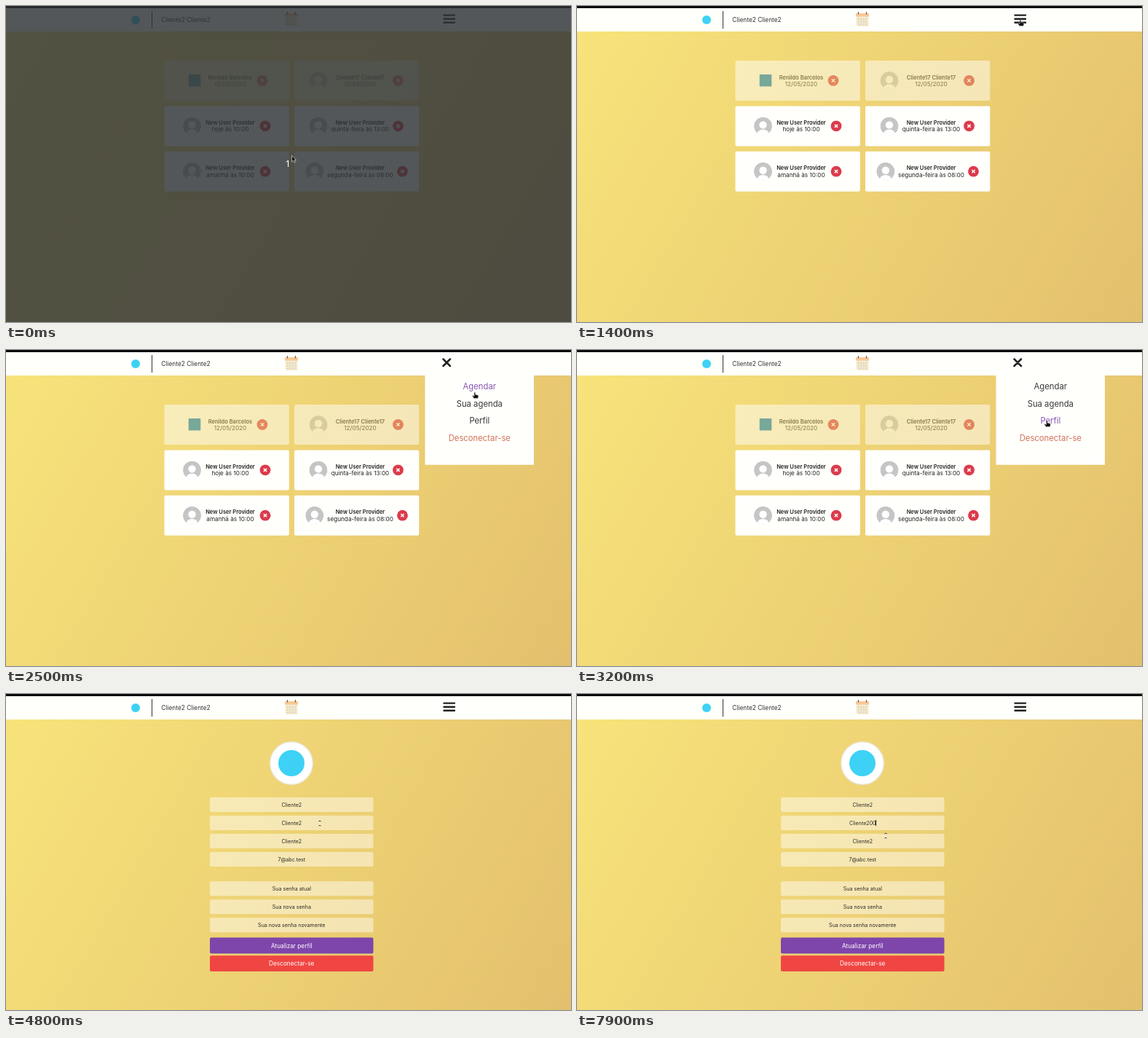
These frames come from a looping animation (776 px wide and 434 px high, 8 s). An HTML page:

```html
<!DOCTYPE html>
<html lang="pt">
<head>
<meta charset="utf-8">
<style>
  html, body { margin: 0; width: 100%; height: 100%; overflow: hidden; }
  svg { display: block; width: 100vw; height: 100vh; font-family: Inter, sans-serif; }
  .mid { text-anchor: middle; }
  .field { font-size: 7.1px; fill: #2b2822; }
  .menu { font-size: 11.3px; fill: #383838; }
</style>
</head>
<body>
<svg id="stage" viewBox="0 0 776 434">
  <defs>
    <linearGradient id="bg" gradientUnits="userSpaceOnUse" x1="5" y1="-6" x2="771" y2="440">
      <stop offset="0" stop-color="#f8e47b"/>
      <stop offset="1" stop-color="#e3c06d"/>
    </linearGradient>
    <clipPath id="round"><circle r="12.5"/></clipPath>
    <clipPath id="below"><rect y="35" width="776" height="399"/></clipPath>
    <g id="avatar" clip-path="url(#round)">
      <circle r="12.5" fill="#c5c5c5"/>
      <circle cy="-1.5" r="5.2" fill="#fff"/>
      <ellipse cy="10.5" rx="8" ry="5.8" fill="#fff"/>
    </g>
    <g id="cancel">
      <circle r="7.4" fill="#db3b4b"/>
      <path d="M-2.1-2.1 2.1 2.1M2.1-2.1-2.1 2.1" stroke="#fff" stroke-width="1.5"/>
    </g>
  </defs>

  <rect width="776" height="434" fill="url(#bg)"/>
  <g id="agenda"></g>
  <g id="profile">
    <circle cx="392" cy="95" r="29.3" fill="#fff" stroke="#ebe6d8" stroke-width="1.4"/>
    <circle cx="392" cy="95" r="18" fill="#3dd2f5"/>
  </g>

  <g clip-path="url(#below)">
    <g id="panel"><rect x="575.5" y="20" width="149.5" height="137.7" fill="#fffffc"/></g>
  </g>

  <rect width="776" height="35" fill="#fffffc"/>
  <rect width="776" height="3" fill="#0a0808"/>
  <circle cx="178" cy="19" r="6" fill="#3dd2f5"/>
  <path d="M200.5 7V31" stroke="#333"/>
  <text x="213.3" y="22" font-size="8.35" fill="#333">Cliente2 Cliente2</text>
  <g id="calendar">
    <path d="M383.5 11H400.5V28H385.5L383.5 26Z" fill="#f3ead2"/>
    <path d="M383 10H401V14.5H383Z" fill="#f9c993"/>
    <path d="M386.5 8V11.5M397.5 8V11.5" stroke="#655b50" stroke-width="1.2"/>
    <path d="M386 18H399M386 21.5H399M386 25H399" stroke="#d9cba8" stroke-width="1.4" stroke-dasharray="1.8 1.6"/>
  </g>
  <path id="burger" d="M601.5 12.6H616M601.5 17.7H616M601.5 22.8H616" stroke="#222" stroke-width="2.4" stroke-linecap="round"/>
  <path id="close" d="M600.5 12.5 610 22M610 12.5 600.5 22" stroke="#222" stroke-width="2.5" stroke-linecap="round"/>

  <g id="shade">
    <rect width="776" height="434" fill="#2e3236" opacity=".82"/>
    <text x="383.6" y="221" font-size="13" fill="#fff" font-family="Noto Sans, sans-serif">1</text>
  </g>

  <path id="caret" d="M0 173V181" stroke="#111"/>
  <path id="arrow" d="M0 0V8.4L2 6.7 3.4 9.6 5 8.9 3.6 6.1H6.2Z" fill="#111" stroke="#fff" stroke-width=".6"/>
  <path id="hand" d="M0 .4Q.9-.4 1.7.5V3.2L5.2 4Q6 4.3 5.8 5.5L5.2 8.4H-.4L-2.5 5.2Q-2.4 4.2-1.2 4.7L0 5.5Z" fill="#111" stroke="#fff" stroke-width=".4"/>
  <g id="beam">
    <path d="M0-3V4" stroke="#fff" stroke-width="1" opacity=".7"/>
    <path d="M-1.7-2 0-2.8 1.7-2M-1.4 4 0 3.3 1.4 4" fill="none" stroke="#222" stroke-width=".9"/>
  </g>
</svg>
<script>
const $ = id => document.getElementById(id);

function add(parent, tag, attrs, text) {
  const el = document.createElementNS("http://www.w3.org/2000/svg", tag);
  for (const k in attrs) el.setAttribute(k, attrs[k]);
  if (text) el.textContent = text;
  parent.appendChild(el);
  return el;
}

// Appointment cards: name, time, distance of avatar and badge from the text centre
const provider = "New User Provider";
[
  ["Renildo Barcelos", "12/05/2020", 49, 44],
  ["Cliente17 Cliente17", "12/05/2020", 57.5, 52],
  [provider, "hoje às 10:00", 52.5, 48],
  [provider, "quinta-feira às 13:00", 57.5, 52],
  [provider, "amanhã às 10:00", 52.5, 48],
  [provider, "segunda-feira às 08:00", 62.7, 58],
].forEach(([name, when, left, right], i) => {
  const x = i % 2 ? 396 : 217.5, y = 75 + 62.4 * (i >> 1), mid = i % 2 ? 486.5 : 308;
  const card = add($("agenda"), "g", { opacity: i < 2 ? 0.5 : 1 });
  add(card, "rect", { x, y, width: 171.3, height: 55, rx: 2, fill: "#fffffc" });
  if (i) add(card, "use", { href: "#avatar", x: mid - left, y: y + 27.5 });
  else add(card, "rect", { x: 250.7, y: 94, width: 16.6, height: 16.6, rx: 1, fill: "#0079bf" });
  add(card, "text", { class: "mid", x: mid, y: y + 25.6, "font-size": 7.5, "font-weight": 600, fill: "#222" }, name);
  add(card, "text", { class: "mid", x: mid, y: y + 34.8, "font-size": 8.2, fill: "#222" }, when);
  add(card, "use", { href: "#cancel", x: mid + right, y: y + 27.4 });
});

// Profile form
const user = "Cliente2";
const fields = [
  [142, user], [167, user], [192, user], [217, "7@abc.test"],
  [257.3, "Sua senha atual"], [282.3, "Sua nova senha"], [307.3, "Sua nova senha novamente"],
].map(([y, label]) => {
  add($("profile"), "rect", { x: 280, y, width: 224.5, height: 20, rx: 2, fill: "#fff", opacity: 0.46 });
  return add($("profile"), "text", { class: "mid field", x: 392.3, y: y + 12.6 }, label);
});
[[334.6, "Atualizar perfil", "#7e46ab"], [359.2, "Desconectar-se", "#f04643"]].forEach(([y, label, fill]) => {
  add($("profile"), "rect", { x: 280, y, width: 224.5, height: 21.8, rx: 2, fill });
  add($("profile"), "text", { class: "mid", x: 392.2, y: y + 13.9, "font-size": 8.25, fill: "#fff" }, label);
});

const items = ["Agendar", "Sua agenda", "Perfil", "Desconectar-se"].map((label, i) =>
  add($("panel"), "text", { class: "mid menu", x: 650.3, y: 54.4 + 23.5 * i }, label));

// Pointer: time, x, y
const path = [
  [0, 392.5, 205.5], [400, 392.5, 205.5], [500, 429.5, 167.5], [600, 429.5, 167.5],
  [1400, 608, 19], [2000, 608, 19], [2500, 643, 58], [3200, 644.5, 97],
  [4100, 644.5, 97], [4400, 474.5, 138.5], [4500, 474.5, 138.5], [4800, 431, 177],
  [7300, 431, 177], [7900, 424, 194],
];

function pointer(t) {
  const n = path.findIndex(p => p[0] >= t);
  if (n < 1) return path[0].slice(1);
  const a = path[n - 1], b = path[n];
  const k = (t - a[0]) / (b[0] - a[0]), s = k * k * (3 - 2 * k);
  return [a[1] + (b[1] - a[1]) * s, a[2] + (b[2] - a[2]) * s];
}

const show = (id, on) => $(id).style.display = on ? "" : "none";
const within = (t, a, b) => t >= a && t < b;

function draw(t) {
  const profile = t >= 3700, open = within(t, 1700, 3700);
  show("shade", t < 100);
  show("agenda", !profile);
  show("profile", profile);
  show("burger", !open);
  show("close", open);
  show("panel", open);

  const drop = Math.min(1, Math.max(0, (t - 1600) / 600));
  $("panel").setAttribute("transform", `translate(0 ${-123 * (1 - drop) ** 3})`);

  const [x, y] = pointer(t);
  let hand = within(t, 1300, 3700) && y < 27;
  items.forEach((el, i) => {
    const over = open && t > 2100 && x > 618 && Math.abs(y - 50.5 - 23.5 * i) < 9;
    el.style.fill = over ? "#8656b3" : i === 3 ? "#d27259" : "";
    hand = hand || over;
  });

  fields[1].textContent = user + (t >= 6300 ? "00" : t >= 6100 ? "0" : "");
  const caret = within(t, 5100, 5600) || within(t, 6100, 6900) || t >= 7400;
  show("caret", caret);
  if (caret) {
    const end = 392.3 + fields[1].getComputedTextLength() / 2;
    $("caret").setAttribute("transform", `translate(${Math.floor(end) + 0.5} 0)`);
  }

  const beam = t >= 4600 && y > 142;
  show("beam", beam);
  show("hand", hand);
  show("arrow", !hand && !beam);
  $(beam ? "beam" : hand ? "hand" : "arrow").setAttribute("transform", `translate(${x} ${y})`);
}

function tick() {
  draw(Math.floor(performance.now() % 8000 / 100) * 100);
  requestAnimationFrame(tick);
}
tick();
</script>
</body>
</html>
```
